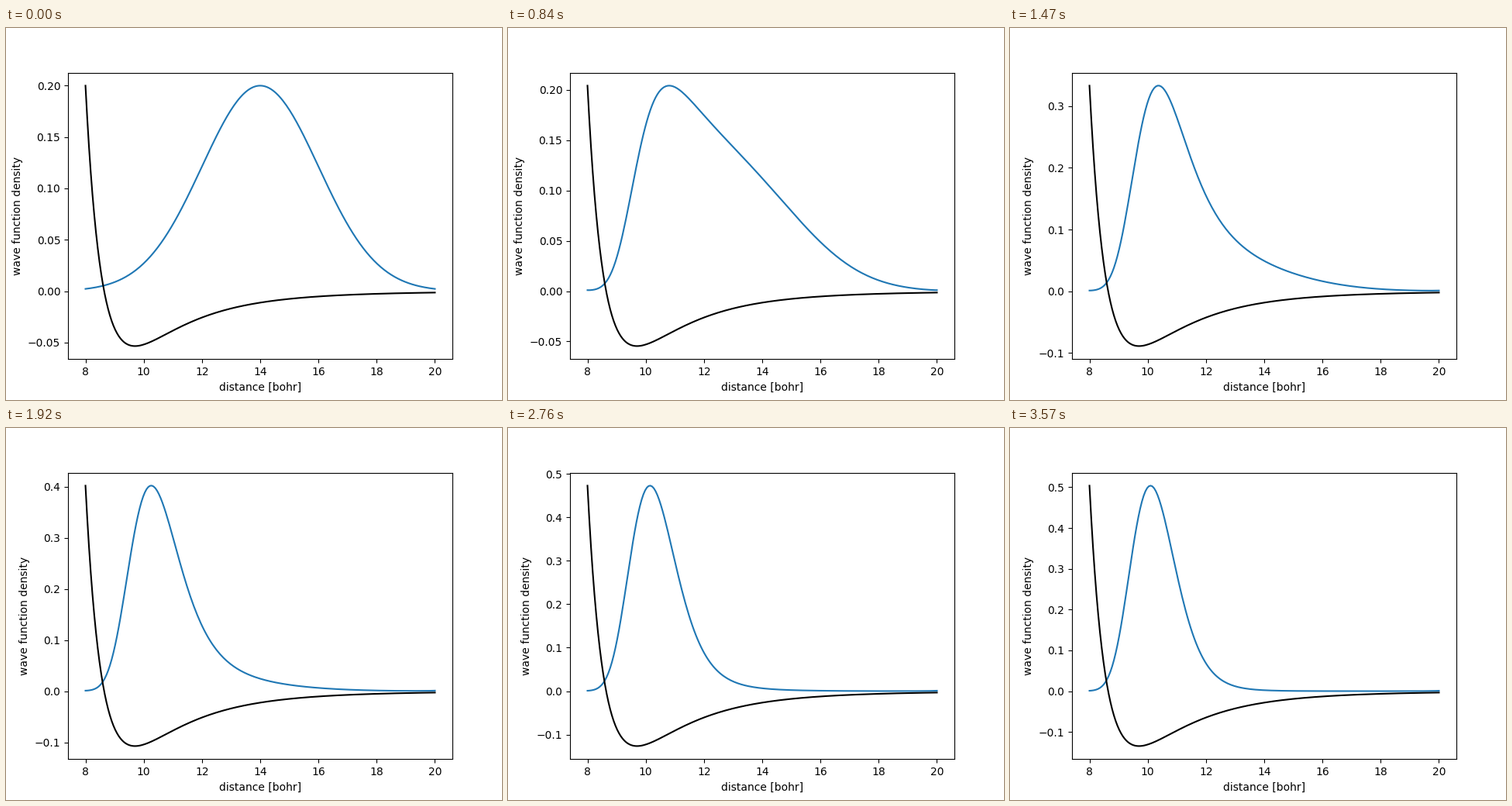
A matplotlib script that plays this animation: 640 px wide and 480 px high, repeating every 3600 ms.

```python
import numpy as np
import matplotlib.pyplot as plt
from matplotlib.animation import FuncAnimation

FRAMES = 120
INTERVAL = 30
SUBSTEPS = 8
R_MIN = 9.7                 # position of the potential minimum
EDGE = np.sqrt(0.001)       # smallest amplitude kept at both ends

# density maxima at a few steps, used to calibrate depth and mobility
STEPS = np.array([19, 38, 49, 64, 92, 119])
PEAKS = np.array([0.1682, 0.2677, 0.3331, 0.4023, 0.4731, 0.5037])

x = np.linspace(8, 20, 201)
dx = x[1] - x[0]
ratio = (R_MIN / x) ** 6
potential = ratio ** 2 - 2 * ratio


def normalise(psi):
    return psi / np.sqrt(np.sum(psi ** 2) * dx)


def propagator(depth, mobility):
    """Imaginary-time step with both end points held."""
    n = len(x)
    laplace = (np.eye(n, k=1) + np.eye(n, k=-1) - 2 * np.eye(n)) / dx ** 2
    h = np.diag(depth * potential) - mobility * laplace
    h[[0, -1]] = 0
    step = np.linalg.inv(np.eye(n) + h / SUBSTEPS)
    return np.linalg.matrix_power(step, SUBSTEPS)


def evolve(log_params):
    """Density for every frame."""
    step = propagator(*np.exp(log_params))
    psi = normalise(np.exp(-(x - 14) ** 2 / 16))
    densities = [psi ** 2]
    for _ in range(FRAMES - 1):
        psi = normalise(step @ psi)
        psi[[0, -1]] = np.maximum(psi[[0, -1]], EDGE)
        densities.append(psi ** 2)
    return np.array(densities)


def peaks(log_params):
    return evolve(log_params)[STEPS].max(axis=1)


def calibrate(params, rounds=10, eps=1e-3):
    """Gauss-Newton fit of the two rates to the known maxima."""
    for _ in range(rounds):
        base = peaks(params)
        jac = np.array([(peaks(params + eps * e) - base) / eps
                        for e in np.eye(2)]).T
        delta = np.linalg.lstsq(jac, PEAKS - base, rcond=None)[0]
        params = params + np.clip(delta, -0.25, 0.25)
    return params


densities = evolve(calibrate(np.log([0.07, 0.024])))

fig, ax = plt.subplots(figsize=(6.4, 4.8), dpi=100)
ax.set_xlabel("distance [bohr]")
ax.set_ylabel("wave function density")
wave, = ax.plot(x, densities[0], color="C0")
well, = ax.plot(x, potential, color="black")


def draw(i):
    density = densities[i]
    wave.set_ydata(density)
    well.set_ydata(potential / potential.max() * density.max())
    ax.relim()
    ax.autoscale_view()
    return wave, well


anim = FuncAnimation(fig, draw, frames=FRAMES, interval=INTERVAL,
                     repeat=True, repeat_delay=0)
plt.show()
```
